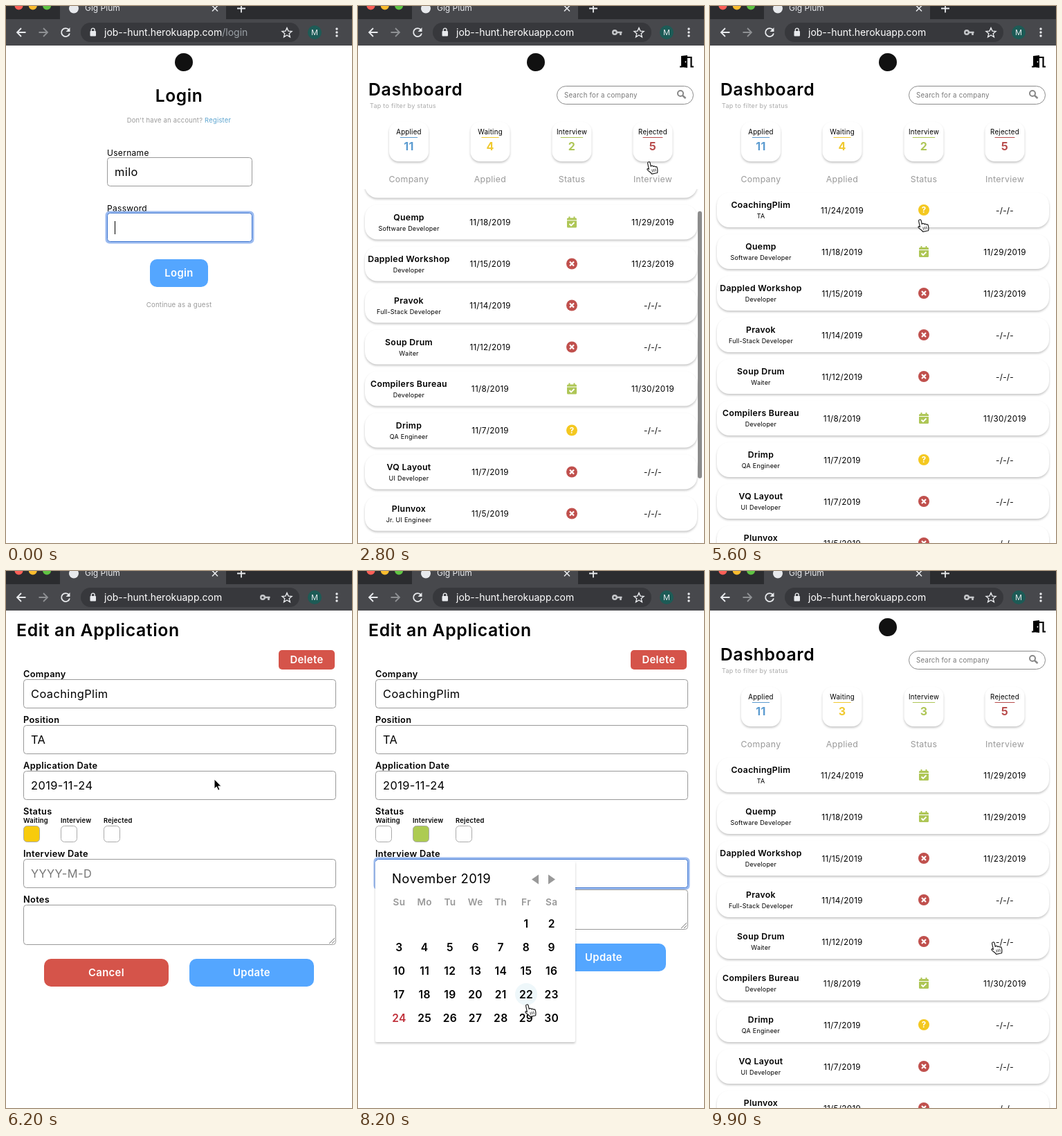
An HTML page for the animation above (10000 ms loop, 500x774 px).

```html
<!DOCTYPE html>
<html lang="en">
<head>
<meta charset="utf-8">
<title>Gig Plum</title>
<style>
html, body { margin: 0; width: 100%; height: 100%; overflow: hidden; background: #fff; }
svg { display: block; width: 500px; height: 774px; }
text { font-family: Inter, sans-serif; letter-spacing: .025em; white-space: pre; }
.bar text { letter-spacing: 0; }
.card { fill: #fff; filter: drop-shadow(0 2px 1.5px rgba(0,0,0,.22)); }
</style>
</head>
<body>
<svg id="stage" viewBox="0 0 500 774"></svg>
<script>
const LOOP = 10000, STEP = 100;
const BLUE = '#54a6ff', RED = '#d5544a', GREY = '#999';
const COLS = [73.5, 191, 309, 426];
const STATUS = {
  all: ['Applied', '#5b9bd0'],
  w: ['Waiting', '#f0c92f'],
  i: ['Interview', '#aec656'],
  r: ['Rejected', '#b84c4c']
};
const NONE = '-/-/-';
const JOBS = [
  ['CoachingPlim', 'TA', '24', 'w', NONE],
  ['Quemp', 'Software Developer', '18', 'i', '11/29/2019'],
  ['Dappled Workshop', 'Developer', '15', 'r', '11/23/2019'],
  ['Pravok', 'Full-Stack Developer', '14', 'r', NONE],
  ['Soup Drum', 'Waiter', '12', 'r', NONE],
  ['Compilers Bureau', 'Developer', '8', 'i', '11/30/2019'],
  ['Drimp', 'QA Engineer', '7', 'w', NONE],
  ['VQ Layout', 'UI Developer', '7', 'r', NONE],
  ['Plunvox', 'Jr. UI Engineer', '5', 'r', NONE],
  ['Tarn Lofts', 'Web Developer', '4', 'w', NONE],
  ['Murvale', 'Developer', '1', 'w', NONE]
];

// Timeline, in ms
const DASH = 1000, EDIT = 6100, SAVED = 9400;
const PICK = 7300, OPEN = 7900, CHOSEN = 8600;
const FILTERS = [[0, 'all'], [3200, 'r'], [3700, 'i'], [4100, 'w'], [4700, 'all']];
const CLICKS = [800, 2900, 3400, 3800, 4400, 5800, 7100, 7700, 8400, 9100];
const SCROLL = [[1700, 0], [1900, 22], [2300, 170], [2500, 170], [2900, 0]];
const POINTER = [
  [600, 300, 350], [800, 255, 385], [1100, 255, 385], [1800, 402, 287], [2500, 402, 287],
  [2900, 426, 204], [3100, 426, 204], [3400, 309, 204], [3600, 309, 204], [3800, 203, 204],
  [4100, 203, 204], [4400, 75, 204], [4800, 75, 204], [5600, 303, 308], [5800, 301, 300],
  [6200, 301, 300], [6800, 121, 367], [7100, 92, 379], [7300, 92, 379], [7700, 190, 436],
  [7900, 190, 436], [8200, 244, 625], [8400, 244, 642], [8700, 244, 642], [9100, 355, 577],
  [9400, 355, 577], [9900, 409, 535]
];

function track(keys, t) {
  const n = keys.findIndex(k => k[0] > t);
  if (n === 0) return keys[0].slice(1);
  if (n < 0) return keys[keys.length - 1].slice(1);
  const a = keys[n - 1], b = keys[n], p = (t - a[0]) / (b[0] - a[0]);
  return a.slice(1).map((v, i) => v + (b[i + 1] - v) * p);
}

// Drawing helpers
const text = (x, y, s, size, fill = '#000', weight = 400, anchor = 'start') =>
  `<text x="${x}" y="${y}" font-size="${size}" fill="${fill}" font-weight="${weight}" text-anchor="${anchor}">${s}</text>`;
const mid = (x, y, s, size, fill, weight) => text(x, y, s, size, fill, weight, 'middle');
const rect = (x, y, w, h, r, fill, extra = '') =>
  `<rect x="${x}" y="${y}" width="${w}" height="${h}" rx="${r}" fill="${fill}" ${extra}/>`;
const circle = (x, y, r, fill, extra = '') => `<circle cx="${x}" cy="${y}" r="${r}" fill="${fill}" ${extra}/>`;
const line = (d, stroke, w = 2, extra = '') =>
  `<path d="${d}" fill="none" stroke="${stroke}" stroke-width="${w}" ${extra}/>`;
const shape = (d, fill, extra = '') => `<path d="${d}" fill="${fill}" ${extra}/>`;
const at = (x, y, s) => `<g transform="translate(${x} ${y})">${s}</g>`;

const button = (x, y, w, h, r, fill, label) =>
  rect(x, y, w, h, r, fill) + mid(x + w / 2, y + h / 2 + 5, label, 14.8, '#fff', 600);

function field(x, y, w, h, value = '', focus = false, fill = '#000') {
  const ring = focus ? rect(x - .5, y - .5, w + 1, h + 1, 4, 'none', 'stroke="#9dbcf0" stroke-width="4"') : '';
  return ring + rect(x + .5, y + .5, w - 1, h - 1, 4, '#fff', `stroke="${focus ? '#3f76d0' : GREY}"`) +
    text(x + 11, y + 27, value, 16.4, fill);
}

function icon(kind) {
  const fill = STATUS[kind][1];
  if (kind === 'w') return circle(0, 0, 8, '#f4c820') + mid(0, 4.2, '?', 11.5, '#fff', 700);
  if (kind === 'r') return circle(0, 0, 8, '#c0504d') + line('M-3-3L3 3M3-3L-3 3', '#fff', 2.2);
  return rect(-7, -6, 14, 14, 1.5, fill) + line('M-3.5-8V-5M3.5-8V-5', fill, 2) +
    line('M-7-2.5H7', '#fff', 1) + line('M-3.5 2.5L-1 5L3.5 .5', '#fff', 1.8);
}

function browser(login) {
  const light = '#e8eaed', bar = '#47484c', strip = '#2b2c2f';
  let s = rect(0, 0, 500, 57, 0, bar) + rect(0, 0, 78, 19, 0, strip) + rect(318, 0, 182, 19, 0, strip);
  ['#ff5f57', '#febc2e', '#60c443'].forEach((c, i) => s += circle(18.5 + i * 20.3, -.5, 6, c));
  s += circle(98, 3.5, 7, light) + text(114, 7, 'Gig Plum', 12, light);
  s += line('M298-.5l8 8M306-.5l-8 8', light, 1.6) + line('M334 3.5h12M340-3v12.5', light, 1.8);
  s += line('M28.5 38H16.5M22 32l-6 6l6 6', light, 1.8) + line('M47.5 38h12M54 32l6 6l-6 6', '#8e9093', 1.8);
  s += line('M91 34.5a6 6 0 1 0 1 5', light, 1.8) + shape('M92.5 31v6h-6z', light);
  s += rect(108, 24, 316, 28, 14, '#37383c');
  s += rect(121.5, 36, 8.5, 7.5, 1, light) + line('M123.3 36.5v-2a2.4 2.4 0 0 1 4.8 0v2', light, 1.4);
  s += text(142, 43, `job--hunt.herokuapp.com<tspan fill="#9aa0a6">${login ? '/login' : ''}</tspan>`, 14, '#fff');
  if (!login) s += circle(371, 38, 2.8, 'none', 'stroke="#c5c7ca" stroke-width="2.4"') +
    line('M374 38h7.5M379.5 38v4', '#c5c7ca', 2.6);
  s += shape('M406 31.5l2 4.6l5 .4l-3.8 3.3l1.2 4.9l-4.4-2.7l-4.4 2.7l1.2-4.9l-3.8-3.3l5-.4z', 'none',
    `stroke="${light}" stroke-width="1.4"`);
  s += circle(446, 38, 10, '#1d5b56') + mid(446, 42, 'M', 11, light);
  [33, 38, 43].forEach(y => s += circle(478, y, 1.7, light));
  return `<g class="bar">${s}</g>`;
}

const logo = () => circle(257, 81, 13, '#111');

function loginPage(t) {
  const typed = Math.min(8, t / 100);
  let s = logo() + mid(250, 138, 'Login', 24.5, '#000', 600);
  s += mid(250, 168, `Don't have an account? <tspan fill="#5aa3cf">Register</tspan>`, 9.4, GREY);
  s += text(146, 216, 'Username', 12) + field(146, 218, 210, 42, 'milo');
  s += text(146, 296, 'Password', 12) + field(146, 298, 210, 42, '', true);
  for (let i = 0; i < typed; i++) s += circle(161 + i * 9, 319, 3, '#000');
  if (t < 800) s += line(`M${157.5 + typed * 9} 310v19`, '#000', 1);
  return s + button(208, 365, 84, 40, 10, BLUE, 'Login') + mid(250, 434, 'Continue as a guest', 9.6, GREY);
}

function row([name, role, day, kind, meet], y) {
  return at(0, y, rect(10, -25, 480, 50, 18, '#fff', 'class="card"') +
    mid(COLS[0], -3, name, 12.3, '#000', 600) + mid(COLS[0], 12, role, 9) +
    mid(COLS[1], 4.5, `11/${day}/2019`, 11.7) + at(COLS[2], 0, icon(kind)) + mid(COLS[3], 4.5, meet, 11.7));
}

function dashboard(t) {
  const jobs = JOBS.map(j => j.slice());
  if (t >= SAVED) jobs[0].splice(3, 2, 'i', '11/29/2019');
  const filter = FILTERS.filter(f => f[0] <= t).pop()[1];
  const pick = kind => jobs.filter(j => kind === 'all' || j[3] === kind);
  const [scroll] = track(SCROLL, t);

  let s = pick(filter).map((j, i) => row(j, 294 + i * 60 - scroll)).join('');
  if (t >= 2000 && t < 3000) s += rect(491, 266 + scroll * .7, 6, 385, 3, 'rgba(0,0,0,.45)');
  s += rect(0, 57, 500, 207, 0, '#fff') + logo();
  s += shape('M467 72l9-1v18l-9-1zM465 86.5h4v2h-4z', '#000') + circle(473.5, 80.5, 1, '#fff') +
    line('M476 74h5.5v13.5h3.5', '#000', 2.2);
  s += text(15, 129, 'Dashboard', 24.8, '#000', 600) + text(17, 147, 'Tap to filter by status', 9.1, '#aaa');
  s += rect(287.5, 115.5, 197, 26, 13, '#fff', 'stroke="#8a8a8a"');
  s += text(298, 132, 'Search for a company', 9.7, '#777');
  s += circle(466, 126, 4, 'none', 'stroke="#888" stroke-width="2"') + line('M469 129l4.5 4', '#888', 2.4);
  Object.entries(STATUS).forEach(([kind, [label, color]], i) => {
    const x = COLS[i], w = label.length * 1.8;
    s += rect(x - 28.5, 167, 57, 57, 14, '#fff', 'class="card"') + mid(x, 185, label, 9.7);
    s += line(`M${x - w} 189.5h${w * 2}`, color, 1) + mid(x, 208, pick(kind).length, 16, color, 700);
    s += mid(x, 254, ['Company', 'Applied', 'Status', 'Interview'][i], 12.3, GREY);
  });
  return s;
}

function calendar(x, y) {
  let s = rect(25, 418, 289, 261, 2, '#fff', 'class="card"') + text(49, 450, 'November 2019', 18.4);
  s += shape('M261 437.5v14l-10-7zM275 437.5v14l10-7z', GREY);
  const colX = i => 59.5 + i * 36.7;
  ['Su', 'Mo', 'Tu', 'We', 'Th', 'Fr', 'Sa'].forEach((d, i) => s += mid(colX(i), 482, d, 13.6, GREY, 600));
  for (let day = 1; day <= 30; day++) {
    const cell = day + 4, cx = colX(cell % 7), cy = 508 + Math.floor(cell / 7) * 34;
    if (Math.abs(x - cx) < 18 && y - cy > -17 && y - cy < 17.5) s += circle(cx, cy, 16, '#eef7fa');
    s += mid(cx, cy + 6, day, 15.6, day === 24 ? '#c0303a' : '#000', 600);
  }
  return s;
}

function editPage(t, x, y) {
  const open = t >= OPEN && t < CHOSEN, lift = open ? 22 : 0;
  const label = (y, s) => text(25, y, s, 12.8, '#000', 600);
  const wide = (y, ...rest) => field(25, y, 452, 42, ...rest);
  let s = text(15, 94, 'Edit an Application', 24.8, '#000', 600) + button(394, 114, 81, 28, 5, RED, 'Delete');
  s += label(153, 'Company') + wide(156, JOBS[0][0]) + label(219, 'Position') + wide(222, 'TA');
  s += label(285, 'Application Date') + wide(288, '2019-11-24') + label(351, 'Status');
  const chosen = t < PICK ? 'w' : 'i';
  [['w', 25, '#f8cb0c'], ['i', 79, '#adcb52'], ['r', 141, RED]].forEach(([kind, bx, color]) => {
    s += text(bx, 363, STATUS[kind][0], 9.4, '#000', 600) +
      rect(bx + .5, 367.5, 23, 23, 5, kind === chosen ? color : '#fff', 'stroke="#aaa"');
  });
  s += label(412, 'Interview Date');
  s += t < CHOSEN ? wide(415, 'YYYY-M-D', open, '#777') : wide(415, '2019-11-29');
  s += at(0, -lift, (open ? '' : label(478, 'Notes')) + field(25, 481, 452, 58) +
    line('M467 537l8-8M471 537l4-4', '#777', 1) +
    button(55, 559, 180, 40, 10, RED, 'Cancel') + button(265, 559, 180, 40, 10, BLUE, 'Update'));
  return s + (open ? calendar(x, y) : '');
}

function pointer(t, x, y) {
  if (t < 600) return '';
  const age = t - CLICKS.filter(c => c <= t).pop();
  const ring = age <= 200 ? circle(x - 1, y + .5, 21 + age / 20, 'none', 'stroke="#111" stroke-width="1.5"') : '';
  const arrow = t > EDIT && t < PICK - 200;
  const hand = shape('M-1.8 1.6Q-1.8 0 0 0T1.8 1.6V7Q2 6 3.6 6.3T5.2 8Q6.8 7 8.2 9Q10 8.5 10.3 10.5V13Q10 16 9 18H1Q0 15.5-2.5 13T-4 9.5Q-2.8 8.5-1.8 10.5Z',
    '#fff', 'stroke="#222" stroke-width="1.2" stroke-linejoin="round"') + line('M2.5 11.5v4M4.9 11.5v4M7.3 11.5v4', '#222', .8);
  const tip = shape('M0 0V14L3.3 11L5.6 16.2L8 15.2L5.7 10.2H10Z', '#000', 'stroke="#fff"');
  return ring + at(x, y, arrow ? tip : `<g transform="rotate(-12)">${hand}</g>`);
}

const stage = document.getElementById('stage');
let shown = -1;
function frame(now) {
  const t = Math.floor(now % LOOP / STEP) * STEP;
  if (t !== shown) {
    shown = t;
    const [x, y] = track(POINTER, t);
    const page = t < DASH ? loginPage(t) : t >= EDIT && t < SAVED ? editPage(t, x, y) : dashboard(t);
    stage.innerHTML = rect(0, 0, 500, 774, 0, '#fff') + page + browser(t < DASH) + pointer(t, x, y);
  }
  requestAnimationFrame(frame);
}
frame(0);
</script>
</body>
</html>
```
